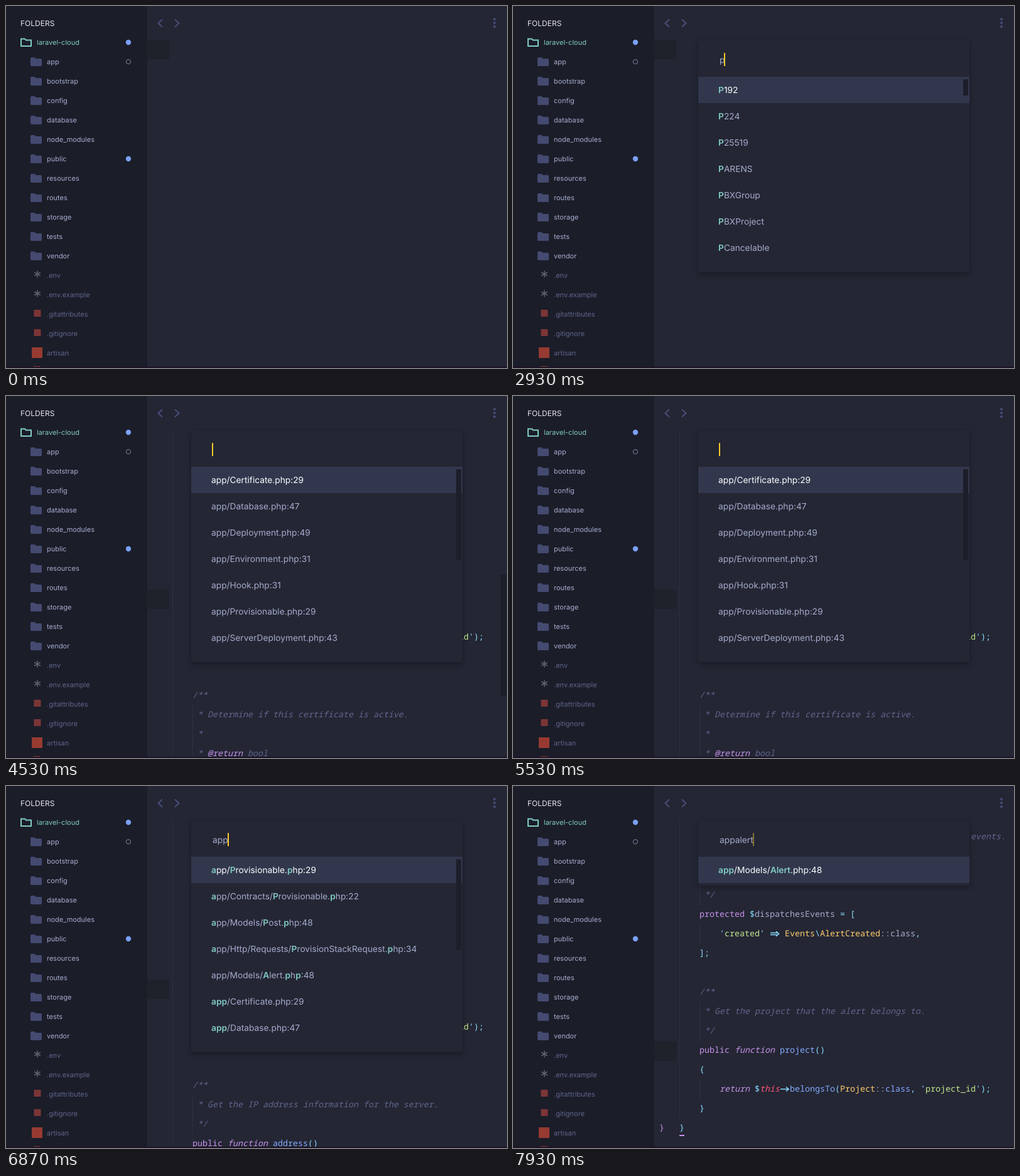
Write an HTML page that moves like this. It is 798x578 px and loops after 8 s.

```html
<!DOCTYPE html>
<html lang="en">
<head>
<meta charset="utf-8">
<title>Editor: go to symbol</title>
<style>
html, body { margin: 0; width: 100%; height: 100%; overflow: hidden; background: #242634; }
body { position: relative; color: #a6accd; font: 11px Inter, sans-serif; text-rendering: geometricPrecision; }
div, #art { position: absolute; white-space: pre; }
#art { left: 0; top: 0; }
#side { left: 0; top: 0; width: 225px; height: 578px; background: #1b1d29; }
.item { line-height: 30px; }
.dim { color: #5f658b; }
.open { color: #80cbc4; }
.title { font-size: 12px; color: #e6e7ef; }
#gutter { left: 225px; width: 35px; height: 31px; background: #1f212b; }
#code { inset: 0; font: 500 13.333px/31px "Noto Sans Mono", monospace; }
.guide { width: 1px; background: #2e3144; }
.line { height: 31px; }
k { color: #c792ea; } o { color: #89ddff; } y { color: #ffcb6b; } f { color: #82aaff; }
g { color: #c3e88d; } r { color: #ff5572; } n { color: #60668c; }
n, r, em { font-style: italic; }
svg.arrow { width: 16px; height: 10px; vertical-align: -1px; fill: none; stroke: #89ddff; stroke-width: 1.6; }
#thumb { left: 788px; width: 9px; background: #1c1e2a; }
#panel { left: 295px; top: 55px; width: 432px; overflow: hidden; background: #242634; border-radius: 3px;
  box-shadow: 0 3px 8px rgba(0,0,0,.32); font-size: 13.75px; }
#input { left: 34px; top: 12px; line-height: 40px; }
#caret { display: inline-block; width: 2px; height: 21px; margin-left: -1px; vertical-align: -5px; background: #ffcb2b; }
.row { left: 0; width: 400px; padding: 1px 0 0 32px; height: 41px; line-height: 42px; }
.row:first-child { background: #32374d; color: #fff; }
.row b { color: #80cbc4; font-weight: 600; }
#bar { left: 422px; top: 62px; width: 8px; background: #1c1e2a; }
#edge { left: 0; top: 576px; width: 798px; height: 2px; background: #1d1226; }
</style>
</head>
<body>
<div id="code"></div>
<div id="gutter"></div>
<div id="thumb"></div>
<div id="side"></div>
<svg id="art" width="798" height="578"></svg>
<div id="panel"><div id="input"><span id="query"></span><span id="caret"></span></div><div id="rows" style="top:58px"></div><div id="bar"></div></div>
<div id="edge"></div>
<script>
const $ = id => document.getElementById(id);
const LOOP = 8000;

// Sidebar and toolbar
const folders = 'app bootstrap config database node_modules public resources routes storage tests vendor'.split(' ');
const files = '.env .env.example .gitattributes .gitignore artisan'.split(' ');
const item = (x, y, text, kind = '') =>
  `<div class="item ${kind}" style="left:${x}px;top:${y - 15}px">${text}</div>`;
const square = (x, y, size, fill) => `<rect x="${x}" y="${y}" width="${size}" height="${size}" fill="${fill}"/>`;
const stroke = (d, color, width = 2) => `<path d="${d}" fill="none" stroke="${color}" stroke-width="${width}"/>`;

let side = item(23, 27.5, 'FOLDERS', 'title') + item(49, 58, 'laravel-cloud', 'open');
let art = stroke('M24 52.5h6l2 2h8v9.500h-16z', '#80cbc4');
folders.forEach((name, i) => {
  const y = 89 + 31 * i;
  side += item(65, y, name);
  art += `<path d="M40.500 ${y - 7}h5l2 2h8q1.500 0 1.500 1.500v9q0 1.500-1.500 1.500h-15q-1.500 0-1.500-1.500v-11q0-1.500 1.500-1.500z" fill="#444a70"/>`;
});
files.forEach((name, i) => {
  const y = 430 + 31 * i;
  side += item(65, y, name, 'dim');
  if (i < 2) art += stroke(`M50 ${y - 7.500}v11M45.200 ${y - 4.700}l9.600 5.400M45.200 ${y + .7}l9.600 -5.400`, '#5d6270', 1.6);
  else if (i < 4) art += square(44.5, y - 7, 11, '#7c3536');
  else art += square(41, y - 9, 17, '#973a31');
});
art += square(44, 575, 11, '#8e3a2c');
for (const y of [58, 244]) art += `<circle cx="195" cy="${y}" r="4.2" fill="#7aa0f5"/>`;
art += '<circle cx="195" cy="89" r="3.6" fill="none" stroke="#80859c"/>';
art += stroke('M249 21.500l-6.500 6 6.500 6M269 21.500l6.500 6-6.500 6', '#484e7a');
for (const y of [21, 27, 33]) art += `<circle cx="778" cy="${y}" r="2" fill="#484e7a"/>`;
$('side').innerHTML = side;
$('art').innerHTML = art;

// Code views: each line is [centre y, column, markup]
const arrow = d => `<svg class="arrow" viewBox="0 0 16 10"><path d="${d}"/></svg>`;
const thin = arrow('M1 5H14M10 1.500L14 5L10 8.500'), fat = arrow('M1 3.500H13M1 6.500H13M10 1L14.500 5L10 9');
const fn = name => `<k>public <em>function</em></k> <f>${name}</f><o>()</o>`;
const str = s => `<o>'</o><g>${s}</g><o>'</o>`;
const method = y => [
  [y, 8, fn('project')],
  [y + 31, 8, '<o>{</o>'],
  [y + 62, 12, `<k><em>return</em></k> <o>$</o><r>this</r>${thin}<f>belongsTo</f><o>(</o><y>Project</y>::<f>class</f><o>,</o> ${str('project_id')}<o>);</o>`],
  [y + 93, 8, '<o>}</o>']
];
const note = (y, ...lines) => lines.map((s, i) => [y + 31 * i, i ? 9 : 8, `<n>${s}</n>`]);
const views = {
  none: { mark: 54, lines: [] },
  certificate: { mark: 309, thumb: [285, 195], lines: [...method(323),
    ...note(478, '/**', '* Determine if this certificate is active.', '*', '* <k>@return</k> bool')] },
  provisionable: { mark: 309, thumb: [230, 90], lines: [...method(323),
    ...note(478, '/**', '* Get the IP address information for the server.', '*/'), [571, 8, fn('address')]] },
  alert: { mark: 408, thumb: [420, 155], lines: [
    [81, 62, '<n>events.</n>'], [174, 9, '<n>*/</n>'],
    [205, 8, '<k>protected</k> <o>$</o>dispatchesEvents <o>= [</o>'],
    [236, 12, `${str('created')} ${fat} <y>Events</y><o>\\</o><y>AlertCreated</y>::class<o>,</o>`],
    [267, 8, '<o>];</o>'],
    ...note(329, '/**', '* Get the project that the alert belongs to.', '*/'),
    ...method(422), [546, 0, '<k>}</k>'], [546, 4, '<o>}</o>']] }
};
const box = (cls, x, y, css, text = '') => `<div class="${cls}" style="left:${x}px;top:${y}px;${css}">${text}</div>`;

function showView(name) {
  const { mark, thumb, lines } = views[name];
  let html = '';
  if (lines.length) html += box('guide', 265, 54, `height:${name == 'alert' ? 477 : 524}px`);
  for (const [y, col, text] of lines) {
    if (col > 8) html += box('guide', 297, y - 15.5, 'height:31px');
    html += box('line', 233 + 8 * col, y - 16, '', text);
  }
  if (name == 'alert') html += box('', 265, 557, 'width:8px;height:2px;background:#c792ea');
  $('code').innerHTML = html;
  $('gutter').style.top = mark + 'px';
  if (thumb) $('thumb').style.cssText = `top:${thumb[0]}px;height:${thumb[1]}px`;
}

// Result lists; asterisks enclose matched letters
const words = s => s.split(' ');
const symbols = words('*P*192 *P*224 *P*25519 *P*ARENS *P*BXGroup *P*BXProject *P*Cancelable');
const projects = words('project Project projects projectId ProjectPolicy ProjectFactory ProjectController');
const paths = list => words(list).map(s => s.replace('~', 'app/'));
const places = paths('~Certificate.php:29 ~Database.php:47 ~Deployment.php:49 ~Environment.php:31 ~Hook.php:31 ~Provisionable.php:29 ~ServerDeployment.php:43');

// [time, query, results, scrollbar height]
const steps = [
  [2670, '', symbols.map(s => s.replace(/\*/g, '')), 26],
  [2840, 'p', symbols, 26],
  ...[3080, 3200, 3330, 3470, 3600, 3740].map((t, i) =>
    [t, 'project'.slice(0, i + 2), projects.map(s => `*${s.slice(0, i + 2)}*${s.slice(i + 2)}`), 60]),
  [4300, '', places, 145],
  [5770, 'a', paths('~Models/*A*lert.php:48 *a*pp/Certificate.php:29 *a*pp/Database.php:47 *a*pp/Deployment.php:49 *a*pp/Environment.php:31 *a*pp/Hook.php:31 *a*pp/Provisionable.php:29'), 145],
  [5960, 'ap', paths('*a*pp/*P*rovisionable.php:29 *a*pp/Contracts/*P*rovisionable.php:22 *a*pp/Models/*P*ost.php:48 *a*pp/Http/Requests/*P*rovisionStackRequest.php:34 ~Models/*A*lert.*p*hp:48 *a*pp/Certificate.*p*hp:29 *a*pp/Database.*p*hp:47'), 145],
  [6650, 'app', paths('*a*pp/*P*rovisionable.*p*hp:29 *a*pp/Contracts/*P*rovisionable.*p*hp:22 *a*pp/Models/*P*ost.*p*hp:48 *a*pp/Http/Requests/*P*rovisionStackRequest.*p*hp:34 ~Models/*A*lert.*p*h*p*:48 *app*/Certificate.php:29 *app*/Database.php:47'), 145],
  [7030, 'appa', paths('*app*/Models/*A*lert.php:48 *app*/D*a*tabase.php:47 *app*/Certific*a*te.php:29 *app*/Provision*a*ble.php:29 *app*/Contracts/Provision*a*ble.php:22')],
  [7170, 'appal', paths('*app*/Models/*Al*ert.php:48 *app*/Provision*a*b*l*e.php:29 *app*/Contracts/Provision*a*b*l*e.php:22')],
  [7320, 'appale', paths('*app*/Models/*Ale*rt.php:48 *app*/Provision*a*b*le*.php:29 *app*/Contracts/Provision*a*b*le*.php:22')],
  [7460, 'appaler', ['*app*/Models/*Aler*t.php:48']],
  [7600, 'appalert', ['*app*/Models/*Alert*.php:48']]
];
const previews = [[0, 'none'], [4300, 'certificate'], [5860, 'alert'], [6090, 'provisionable'], [7120, 'alert']];

function showStep([, query, rows, bar = 0]) {
  $('query').textContent = query;
  $('rows').innerHTML = rows.map((s, i) => box('row', 0, 42 * i, '',
    s.split('*').map((part, j) => j % 2 ? `<b>${part}</b>` : part).join(''))).join('');
  // A scrollable list fills the panel's full height
  $('panel').style.height = (bar ? 370 : 62 + 42 * rows.length) + 'px';
  $('bar').style.height = bar + 'px';
}

const latest = (list, t) => list.findLast(entry => entry[0] <= t);
let step, preview;

function draw(now) {
  const t = now % LOOP;
  const nextStep = latest(steps, t), nextPreview = latest(previews, t);
  if (nextStep && nextStep != step) showStep(nextStep);
  if (nextPreview != preview) showView(nextPreview[1]);
  step = nextStep;
  preview = nextPreview;
  $('panel').style.visibility = step ? 'visible' : 'hidden';
  if (step) $('caret').style.opacity = Math.max(0, Math.min(1, .5 + 2 * Math.cos((t - step[0]) * 2 * Math.PI / 1300)));
  const age = t - preview[0];
  $('thumb').style.opacity = preview[1] == 'none' ? 0 : Math.max(0, Math.min(1, (700 - age) / 200));
  requestAnimationFrame(() => draw(performance.now()));
}
draw(performance.now());
</script>
</body>
</html>
```
